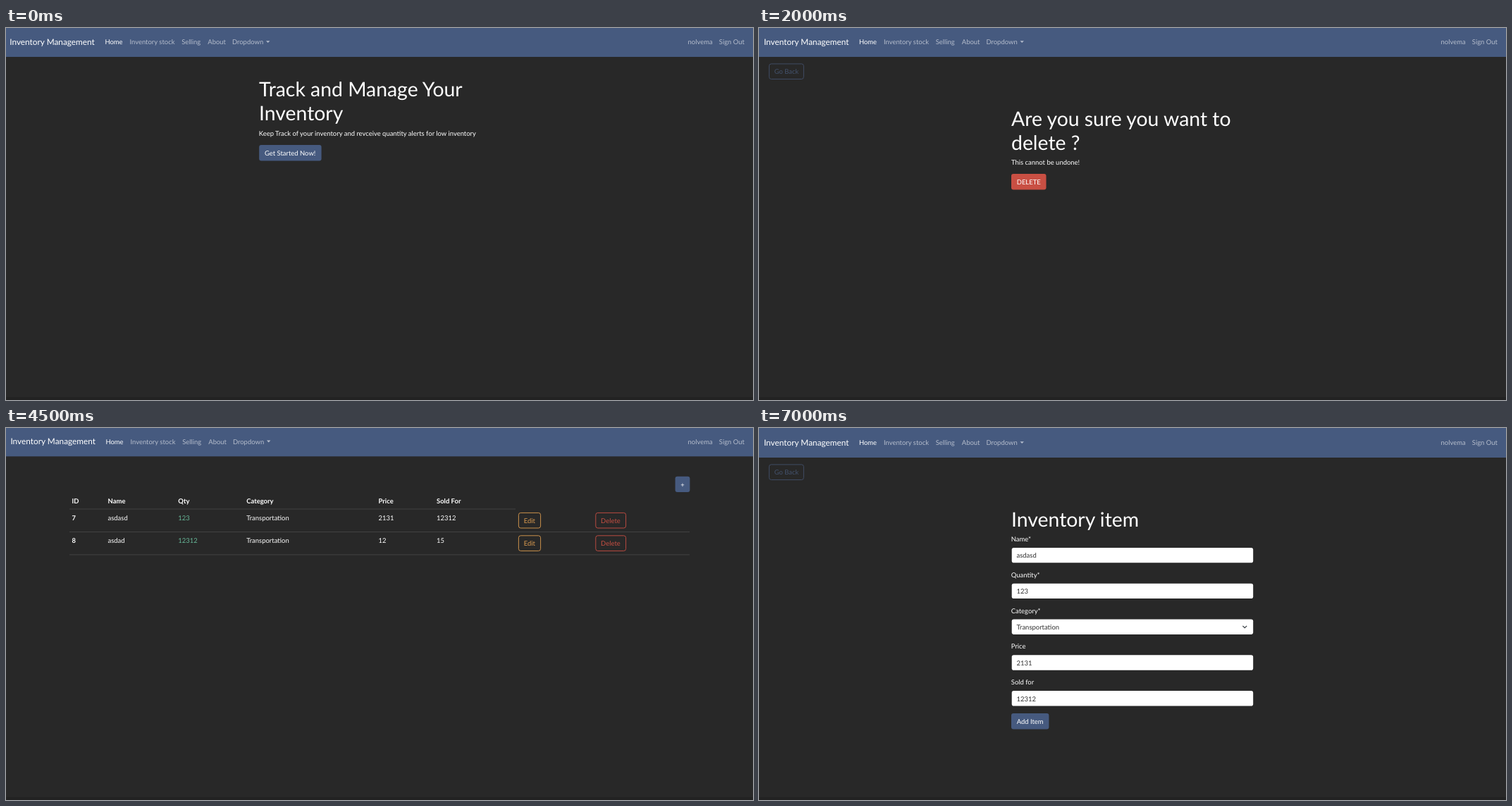
These frames come from a looping animation (1060 by 528 pixels, 8 s). An HTML page:

```html
<!DOCTYPE html>
<html lang="en">
<head>
<meta charset="utf-8">
<title>Inventory Management</title>
<style>
  html, body { margin: 0; width: 100%; height: 100%; overflow: hidden; background: #282828; }
  svg { display: block; }
  text { font: 9.46px Lato, sans-serif; white-space: pre; text-rendering: geometricPrecision; }
</style>
</head>
<body>
<svg id="stage" width="1060" height="528" viewBox="0 0 1060 528"></svg>
<script>
const BLUE = '#465a7f', RED = '#c94f43', ORANGE = '#dc9c50', GREEN = '#67b898', MUTED = '#b5bdcc';
const BODY = 9.46, BRAND = 11.83, TITLE = 28.39, BUTTON_H = 22.4;

const text = (x, y, s, fill = '#fff', size = BODY, weight = 400) =>
  `<text x="${x}" y="${y}" fill="${fill}" style="font-size:${size}px;font-weight:${weight}">${s}</text>`;
const rect = (x, y, w, h, fill, extra = '') =>
  `<rect x="${x}" y="${y}" width="${w}" height="${h}" fill="${fill}" ${extra}/>`;
const line = (x1, x2, y) => rect(x1, y - 0.4, x2 - x1, 0.8, '#484848');
const path = (d, stroke) => `<path d="${d}" fill="none" stroke="${stroke}" stroke-width="1.2"/>`;

const button = (x, y, w, label, fill) =>
  rect(x, y, w, BUTTON_H, fill, 'rx="3"') + text(x + 7.7, y + 14.9, label);
const outline = (x, y, w, label, color, border = color) =>
  rect(x + 0.4, y + 0.4, w - 0.8, BUTTON_H - 0.8, 'none', `rx="3" stroke="${border}" stroke-width=".9"`) +
  text(x + 7.7, y + 14.9, label, color);
const goBack = y => outline(14, y, 49.8, 'Go Back', '#43526d', '#42506a');
const title = (x, y, ...rows) =>
  rows.map((row, i) => text(x, y + i * 34.07, row, '#fff', TITLE)).join('');

// Page frame: the bar sits slightly differently on each page
function page(brandX, shift, barH, content) {
  const y = barH - 17.7, caret = 369 + shift;
  const links = [[141, 'Home', '#fff'], [176, 'Inventory stock'], [249.8, 'Selling'], [286.9, 'About'], [321.5, 'Dropdown']];
  return '<g display="none">' +
    rect(0, 0, 1060, 528, '#282828') + rect(0, 524, 1060, 4, '#222') +
    rect(0, 0, 1060, barH, BLUE) +
    text(brandX - 0.8, y + 0.7, 'Inventory Management', '#fff', BRAND) +
    links.map(([x, s, fill = MUTED]) => text(x + shift - 0.6, y, s, fill)).join('') +
    `<path d="M${caret} ${y - 5}h5.4l-2.7 2.8z" fill="${MUTED}"/>` +
    text(967.6, y, 'nolvema', MUTED) + text(1011.8, y, 'Sign Out', MUTED) +
    content + '</g>';
}

const home =
  title(359, 97.3, 'Track and Manage Your', 'Inventory') +
  text(358.8, 153, 'Keep Track of your inventory and revceive quantity alerts for low inventory') +
  button(359.2, 166, 88.4, 'Get Started Now!', BLUE);

const confirmDelete =
  goBack(50.5) +
  title(358, 138.5, 'Are you sure you want to', 'delete ?') +
  text(358, 194.2, 'This cannot be undone!') +
  button(358, 207.1, 49.5, 'DELETE', RED);

const columns = [93.5, 144.5, 244.3, 341.2, 528.5, 611];
const headers = ['ID', 'Name', 'Qty', 'Category', 'Price', 'Sold For'];
const rows = [
  ['7', 'asdasd', '123', 'Transportation', '2131', '12312'],
  ['8', 'asdad', '12312', 'Transportation', '12', '15'],
];
const stock =
  button(949.6, 68.7, 20.8, '+', BLUE) +
  headers.map((s, i) => text(columns[i], 106.5, s, '#fff', BODY, 700)).join('') +
  line(90, 723, 115) +
  rows.map((row, r) => {
    const y = r * 32.4;
    return row.map((s, i) => text(columns[i], 130.7 + y, s, i === 2 ? GREEN : '#fff', BODY, i ? 400 : 700)).join('') +
      outline(727, 120 + y, 32, 'Edit', ORANGE) +
      outline(836.4, 120 + y, 43.6, 'Delete', RED) +
      line(90, 970, 147.5 + y);
  }).join('');

const fields = [['Name*', 'asdasd'], ['Quantity*', '123'], ['Category*', 'Transportation'], ['Price', '2131'], ['Sold for', '12312']];
const itemForm =
  goBack(51.5) +
  title(358, 139.5, 'Inventory item') +
  fields.map(([label, value], i) => {
    const y = i * 50.8;
    return text(357.8, 161 + y, label) +
      rect(358.7, 169.9 + y, 342.5, 21.4, '#fff', 'rx="2.8"') +
      text(365.5, 184.3 + y, value, '#303030');
  }).join('') +
  path('M686.4 280.8l2.9 2.9 2.9-2.9', '#343a40') +
  button(358, 405, 53.4, 'Add Item', BLUE);

const stage = document.getElementById('stage');
stage.innerHTML =
  page(6, 0, 41, home) +
  page(7.7, 1.5, 41, confirmDelete) +
  page(7.2, 1, 40.3, stock) +
  page(7.7, 1.5, 42, itemForm);

const pages = [...stage.children];
const starts = [0, 500, 3000, 5500], LOOP = 8000;

function draw(now) {
  const t = now % LOOP;
  const current = starts.filter(s => s <= t).length - 1;
  pages.forEach((p, i) => p.setAttribute('display', i === current ? 'inline' : 'none'));
}
const begin = performance.now();
function tick() {
  draw(performance.now() - begin);
  requestAnimationFrame(tick);
}
tick();
</script>
</body>
</html>
```
